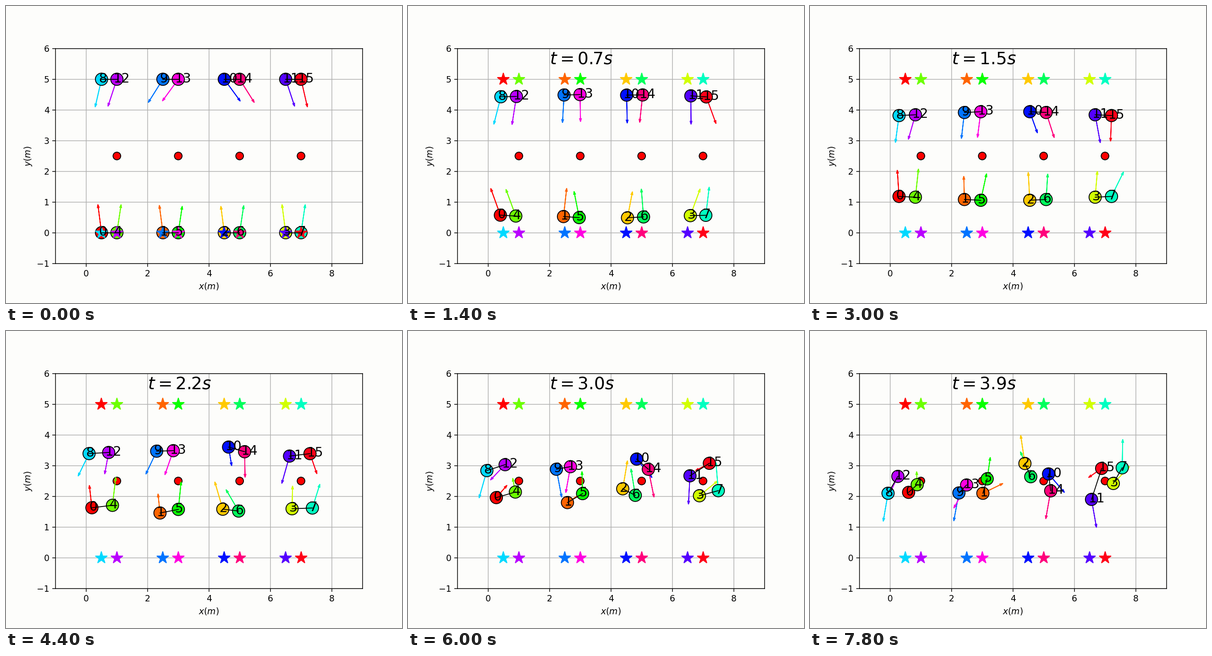
Recreate the animation shown at these times as a matplotlib script. Size 864 by 648 pixels, loop 8000 ms.

```python
import numpy as np
import matplotlib.pyplot as plt
from matplotlib.animation import FuncAnimation
from matplotlib.patches import Circle

FRAMES, INTERVAL, DT = 40, 200, 0.1
KEYS = np.array([0, 15, 26, 39])
STEPS = np.arange(FRAMES)
PAPER = "#fdfdfb"
COLORS = plt.cm.hsv(np.linspace(0, 1, 16))
MIDDLE = 3.75     # centre line the robots spread away from
rng = np.random.default_rng(4)

# Where each robot meets the oncoming one, and where it ends up.
ROUTES = [
    ((.18, 1.83), (.60, 2.13)), ((2.45, 1.64), (3.02, 2.10)),
    ((4.40, 1.90), (4.39, 3.07)), ((6.76, 1.82), (7.27, 2.42)),
    ((.88, 1.97), (.88, 2.38)), ((3.04, 1.85), (3.16, 2.57)),
    ((4.88, 1.77), (4.58, 2.64)), ((7.45, 1.88), (7.56, 2.93)),
    ((.00, 3.14), (-.07, 2.10)), ((2.24, 3.20), (2.24, 2.11)),
    ((4.72, 3.42), (5.16, 2.73)), ((6.59, 3.00), (6.56, 1.90)),
    ((.66, 3.22), (.25, 2.65)), ((2.76, 3.23), (2.49, 2.37)),
    ((5.20, 3.18), (5.23, 2.18)), ((7.29, 3.20), (6.89, 2.91)),
]

fig = plt.figure(figsize=(6.4, 4.8), dpi=135, facecolor=PAPER)
ax = fig.add_subplot(facecolor=PAPER)
ax.set_aspect("equal")
ax.set(xlim=(-1, 9), ylim=(-1, 6), xlabel="$x(m)$", ylabel="$y(m)$",
       xticks=range(0, 9, 2), yticks=range(-1, 7))
ax.grid(True)

for x in (1, 3, 5, 7):
    ax.add_patch(Circle((x, 2.5), 0.125, fc="red", ec="black", zorder=1.6))


def smooth(points):
    """Cubic Hermite curve through the key points, one row per frame."""
    p = np.array(points, float)
    slope = np.gradient(p, KEYS, axis=0)
    k = np.clip(np.searchsorted(KEYS, STEPS, side="right") - 1, 0, len(KEYS) - 2)
    h = (KEYS[k + 1] - KEYS[k])[:, None]
    u = (STEPS - KEYS[k])[:, None] / h
    return ((1 + 2 * u) * (1 - u) ** 2 * p[k] + u * (1 - u) ** 2 * h * slope[k]
            + u ** 2 * (3 - 2 * u) * p[k + 1] - u ** 2 * (1 - u) * h * slope[k + 1])


def first_heading(x, up, second):
    """The lower row leans away from its partner, the upper row from the middle."""
    off = x - MIDDLE
    if up > 0:
        lean = 0.15 if second else -0.13
    else:
        lean = np.sign(off) * (0.88 - 0.2 * abs(off))
    return np.arctan2(up, lean)


def aim_along(path, start_angle):
    """Arrow vectors: swaying about the direction of travel, longer when faster."""
    vx, vy = np.gradient(path, DT, axis=0).T
    sway = 0.2 * np.sin(rng.uniform(0.3, 0.6) * STEPS + rng.uniform(0, 2 * np.pi))
    angle = np.arctan2(vy, vx) + sway
    angle += (start_angle - angle[0]) * np.exp(-STEPS / 2)
    size = np.minimum(0.93, 1.1 * np.hypot(vx, vy) + 0.1)
    return np.stack([size * np.cos(angle), size * np.sin(angle)], axis=1)


class Robot:
    """Disc with number, velocity arrow and a star at its goal."""

    def __init__(self, n, route):
        col, row = n % 4, n // 4
        second, up = row % 2, 1 if row < 2 else -1
        x, y = 0.5 + 2 * col + 0.5 * second, 5 * (row // 2)
        off = x - MIDDLE
        spread = (x + 0.065 * off, y + up * (1.02 + 0.05 * abs(off)))
        self.path = smooth([(x, y), spread, *route])
        self.aim = aim_along(self.path, first_heading(x, up, second))

        color = COLORS[n]
        self.arrow = ax.arrow(x, y, *self.aim[0], head_width=0.06, head_length=0.1,
                              length_includes_head=True, color=color, zorder=1.7)
        self.disc = ax.add_patch(Circle((x, y), 0.2, fc=color, ec="black", zorder=2))
        ax.plot(x, 5 - y, "*", ms=15, color=color, zorder=2)
        self.label = ax.text(x, y, str(n), fontsize=15, zorder=4)

    def move(self, i):
        x, y = self.path[i]
        dx, dy = self.aim[i]
        self.disc.center = x, y
        self.label.set_position((x - 0.1, y - 0.1))
        self.arrow.set_data(x=x, y=y, dx=dx, dy=dy)


robots = [Robot(n, route) for n, route in enumerate(ROUTES)]
pairs = [(robots[n], robots[n + 4]) for n in range(16) if n % 8 < 4]
links = [ax.plot([], [], color="black", lw=1, zorder=3)[0] for _ in pairs]
clock = ax.text(2, 5.5, "", fontsize=20, zorder=4)


def update(i):
    for robot in robots:
        robot.move(i)
    for link, (a, b) in zip(links, pairs):
        link.set_data(*zip(a.path[i], b.path[i]))
    clock.set_text(f"$t={i * DT:.1f}s$" if i else "")
    return []


anim = FuncAnimation(fig, update, frames=FRAMES, interval=INTERVAL,
                     repeat=True, repeat_delay=0, blit=False)
plt.show()
```
